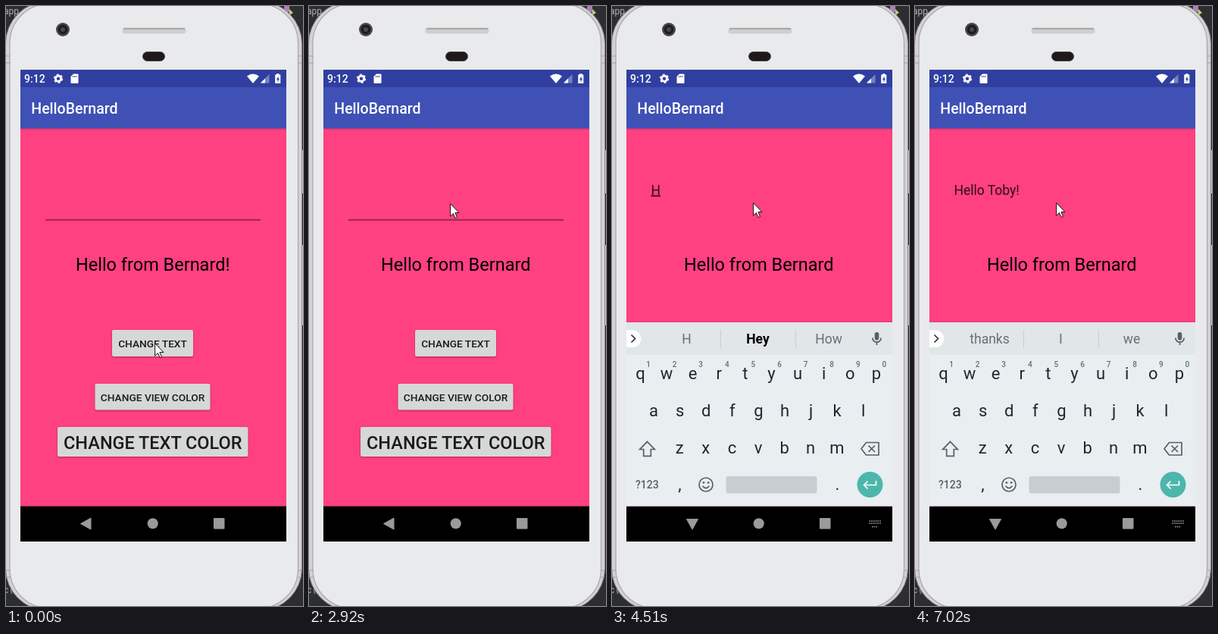
An HTML page that plays this animation: 392 px wide and 791 px high, repeating every 8000 ms.

```html
<!DOCTYPE html>
<html lang="en">
<head>
<meta charset="utf-8">
<title>Phone text demo</title>
<style>
html, body { margin: 0; width: 100%; height: 100%; overflow: hidden; background: #2d2e30; }
svg { display: block; width: 100vw; height: 100vh; font-family: Roboto, sans-serif; }
text { white-space: pre; }
.mid text, text.mid { text-anchor: middle; }
.medium { font-weight: 500; }
.button rect { fill: #d6d7d7; filter: drop-shadow(0 1px 1px #0005); }
.button text { text-anchor: middle; font-weight: 500; fill: #1b1b1b; }
.line { fill: none; stroke: #566167; stroke-width: 1.7; }
#typing { text-decoration: underline 1px; text-underline-offset: 1px; text-decoration-skip-ink: none; }
#suggestions text { font-size: 17.5px; fill: #667075; }
#suggestions text.best { font-weight: 700; fill: #000; }
</style>
</head>
<body>
<svg viewBox="0 0 392 791">
  <defs>
    <clipPath id="screenClip"><rect x="19" y="84" width="351" height="622"/></clipPath>
    <clipPath id="buttonClip"><rect x="140" y="427" width="107" height="35" rx="2"/></clipPath>
    <linearGradient id="shade" x2="0" y2="1">
      <stop stop-color="#000" stop-opacity=".16"/><stop offset="1" stop-color="#000" stop-opacity="0"/>
    </linearGradient>
  </defs>

  <!-- Desktop behind the phone -->
  <rect width="392" height="791" fill="#2d2e30"/>
  <text x="-3" y="10.500" font-size="12" fill="#aeb4ba">app</text>
  <text x="-3" y="774" font-size="12" fill="#b0b4b8">c</text>
  <path d="M8 766Q5 770 8 775" fill="none" stroke="#4a88c7" stroke-width="1.500"/>
  <rect x="367" y="0" width="7" height="8" fill="#a982b4"/>
  <path d="M374 4V12L379 9Z" fill="#c8cc78"/>

  <!-- Phone body -->
  <path d="M391 190V247M391 315V421" stroke="#d3cfd1" stroke-width="2"/>
  <rect x="-.5" y="-6" width="391" height="803" rx="56" fill="#d6d1d4" stroke="#8d898b"/>
  <rect x="5" y="-3" width="380.500" height="797" rx="52" fill="#e9eaec" stroke="#aea9ac" stroke-width="1.300"/>
  <path d="M0 66H6M0 75H6M385 66H390M385 75H390M0 744H6M0 753H6M385 744H390M385 753H390" stroke="#a5a1a3"/>
  <circle cx="75" cy="31" r="9" fill="#4b4647"/>
  <circle cx="75" cy="31" r="6.500" fill="#1f1d20"/>
  <circle cx="75" cy="31" r="3" fill="#494850"/>
  <rect x="153.500" y="28.500" width="84" height="8" rx="3.500" fill="#d0cfd0"/>
  <path d="M155 30H236" stroke="#aaa7a8" stroke-width="2"/>
  <rect x="180.500" y="60.500" width="29" height="12" rx="6" fill="#1e1a1b" stroke="#4a4647"/>

  <g clip-path="url(#screenClip)">
    <rect x="19" y="659" width="351" height="47"/>
    <rect x="19" y="161" width="351" height="498.500" fill="#ff4081"/>
    <rect x="19" y="84" width="351" height="23.500" fill="#303f9f"/>
    <rect x="19" y="107" width="351" height="54.500" fill="#3f51b5"/>
    <rect x="19" y="161.500" width="351" height="2.500" fill="url(#shade)"/>

    <!-- Status bar -->
    <g fill="#fff">
      <text class="medium" x="24" y="100.500" font-size="14">9:12</text>
      <circle cx="69" cy="95.700" r="3.600" fill="none" stroke="#fff" stroke-width="2.800"/>
      <circle cx="69" cy="95.700" r="5.300" fill="none" stroke="#fff" stroke-width="1.800" stroke-dasharray="2.775"/>
      <path d="M89 89.500H94.500Q95.500 89.500 95.500 90.500V101Q95.500 102 94.500 102H86.500Q85.500 102 85.500 101V93Z"/>
      <path d="M88.500 92V94M90.500 92V94M92.500 92V94" stroke="#303f9f"/>
      <path d="M318 92.500Q326 86.500 334 92.500L326 102Z"/>
      <path d="M347.500 90V101.500H336Z" opacity=".35"/>
      <path d="M342 95.500V101.500H336Z"/>
      <path d="M357 89.300H360.500V90.500H362.300V102H355.200V90.500H357Z"/>
      <path d="M359.500 92.500L357 97H358.500V100.500L361 95.800H359.500Z" fill="#303f9f"/>
      <text class="medium" x="33.300" y="141.500" font-size="19.500">HelloBernard</text>
    </g>

    <!-- App content -->
    <rect id="fieldLine" x="52" y="281.500" width="284" height="1" opacity=".75"/>
    <text x="51.500" y="248.500" font-size="17.500" opacity=".82"><tspan id="typed"></tspan><tspan id="typing"></tspan></text>
    <text id="message" class="mid" x="193.700" y="348.700" font-size="23.500"></text>
    <g class="button">
      <rect id="changeText" x="140" y="427" width="107" height="35" rx="2"/>
      <circle id="ripple" cx="184" cy="445" r="40" opacity=".12" clip-path="url(#buttonClip)"/>
      <text x="193.500" y="449.500" font-size="13.700">CHANGE TEXT</text>
      <rect x="117.500" y="498" width="152" height="34.500" rx="2"/>
      <text x="193.500" y="520.500" font-size="13.700">CHANGE VIEW COLOR</text>
      <rect x="68" y="555" width="251.500" height="39" rx="2"/>
      <text x="193.700" y="584" font-size="23.500">CHANGE TEXT COLOR</text>
    </g>

    <!-- Navigation bar -->
    <g fill="#9a9a9a">
      <path id="back" stroke="#9a9a9a" stroke-linejoin="round"/>
      <circle cx="193.700" cy="682.300" r="7"/>
      <rect x="274" y="675" width="14.500" height="14.500" rx="1"/>
      <path id="switcher" d="M339.500 679H355M339.500 682H355M343 686.500H351" stroke="#9a9a9a" stroke-width="1.700" stroke-dasharray="1.700 1"/>
    </g>

    <g id="keyboard">
      <rect x="19" y="415.500" width="351" height="1.500" fill="#000" opacity=".06"/>
      <rect x="19" y="417" width="351" height="242.500" fill="#e9eef1"/>
      <rect x="19" y="417" width="351" height="43" fill="#e1e6e9"/>
      <path d="M143.500 427V451M242.500 427V451" stroke="#c8ced1"/>
      <path d="M19 427.500H27A11 11 0 0 1 27 450H19Z" fill="#fff"/>
      <path class="line" d="M25.500 433.500L30.500 438.500L25.500 443.500" style="stroke:#333"/>
      <rect x="346.700" y="430" width="5.600" height="10.500" rx="2.800" fill="#566167"/>
      <path class="line" d="M343.800 437.500A5.700 5.700 0 0 0 355.200 437.500M349.500 443V447"/>
      <g id="suggestions" class="mid">
        <text x="98.500" y="445.200"></text><text x="192.500" y="445.200"></text><text x="286" y="445.200"></text>
      </g>
      <g id="keys" class="mid" fill="#1c292f"></g>
      <path class="line" d="M46.500 574.300L56.300 584.500H51.300V593.300H41.700V584.500H36.700Z"/>
      <path class="line" stroke-linejoin="round" d="M335.500 575.500H352V592H335.500L329 583.750ZM338.500 579.500L347 588M347 579.500L338.500 588"/>
      <text class="mid medium" x="46.300" y="636.200" font-size="14" fill="#566167">?123</text>
      <circle class="line" cx="124" cy="631" r="9"/>
      <path class="line" d="M119.500 632.800Q124 638.300 128.500 632.800"/>
      <circle cx="120.900" cy="628.300" r="1.400" fill="#566167"/><circle cx="127.100" cy="628.300" r="1.400" fill="#566167"/>
      <rect x="150.500" y="620" width="120" height="22.500" rx="3" fill="#c8cdd1"/>
      <circle cx="340.500" cy="631" r="17" fill="#4db6ac"/>
      <path class="line" d="M348.500 626V631.500H333M337.500 626.500L332.500 631.500L337.500 636.500" style="stroke:#fff"/>
    </g>
    <path id="pointer" d="M0 0V16.500L3.800 12.900L6.500 18.900L8.900 17.900L6.300 11.900H11.400Z" fill="#fff" stroke="#111"/>
  </g>
</svg>
<script>
const LOOP = 8000;
const el = id => document.getElementById(id);
const show = (id, on) => el(id).setAttribute('visibility', on ? 'visible' : 'hidden');

function addKey(x, y, size, label, extra = '') {
  el('keys').insertAdjacentHTML('beforeend', `<text x="${x}" y="${y}" font-size="${size}" ${extra}>${label}</text>`);
}
[['qwertyuiop', 37.5, 491.6], ['asdfghjkl', 55, 540.6], ['zxcvbnm', 89.2, 589.6]].forEach(([row, x, y]) =>
  [...row].forEach((key, i) => addKey(x + i * 34.6, y, 22, key)));
[...'1234567890'].forEach((digit, i) => addKey(48 + i * 34.6, 476.3, 10, digit, 'class="medium" fill="#667075"'));
addKey(89.5, 638, 22, ',');
addKey(297.5, 638, 22, '.');

// Each step: [start time, values...]
const pointerSteps = [
  [0, 196.6, 444.7], [1790, 195.6, 443.7], [1940, 194.6, 318.7], [2090, 194.6, 263.7],
  [2240, 186, 400], [2370, 182.6, 444.7], [2920, 186.6, 260.7], [3070, 186.6, 259.7]
];
const idleWords = ['thanks', 'I', 'we'];
// [start, committed text, word being typed, suggestions]
const typingSteps = [
  [0, '', '', idleWords],
  [4510, '', 'H', ['H', 'Hey', 'How']],
  [5040, '', 'He', ['H', 'Hey', 'How']],
  [5190, '', 'Hel', ['Hel', 'Hello', 'Help']],
  [5460, '', 'Hell', ['Hell', 'Hello', 'Help']],
  [5580, '', 'Hello', ['Help', 'Hello', 'Hellos']],
  [5730, 'Hello ', '', ['to', 'and', 'the']],
  [6130, 'Hello ', 'T', ['T', 'The', 'To']],
  [6280, 'Hello ', 'To', ['To', 'Too', 'Took']],
  [6430, 'Hello ', 'Tob', ['Tob', 'Toby', 'Tobias']],
  [6580, 'Hello ', 'Toby', ['Toby', 'Toby', 'Tobias']],
  [7020, 'Hello Toby!', '', idleWords]
];
const stepAt = (steps, t) => steps.findLast(([start]) => start <= t);

function render(t) {
  const [, x, y] = stepAt(pointerSteps, t);
  el('pointer').setAttribute('transform', `translate(${x} ${y})`);

  el('message').textContent = 'Hello from Bernard' + (t < 550 ? '!' : '');
  const pressed = (t >= 400 && t < 550) || (t >= 2790 && t < 2920);
  el('changeText').style.fill = pressed ? '#c4c5c5' : '';
  el('changeText').style.filter = pressed ? 'drop-shadow(0 2px 1.5px #0006)' : '';
  show('ripple', t >= 2640 && t < 2790);
  show('fieldLine', t < 3350);

  const imeOpen = t >= 3620;
  el('back').setAttribute('d', imeOpen ? 'M98.500 676.500H113.500L106 690Z' : 'M98.500 682.500L112 675V690Z');
  show('switcher', imeOpen);

  // The keyboard slides up slightly translucent, overlapping the navigation bar
  const entering = t >= 3770 && t < 3890;
  show('keyboard', t >= 3770);
  el('keyboard').setAttribute('opacity', entering ? 0.9 : 1);
  el('keyboard').setAttribute('transform', `translate(0 ${entering ? 3.4 : 0})`);

  const [, committed, word, words] = stepAt(typingSteps, t);
  el('typed').textContent = committed;
  el('typing').textContent = word;
  [...el('suggestions').children].forEach((node, i) => {
    node.textContent = words[i];
    node.setAttribute('class', i === 1 && word ? 'best' : '');
  });
}

function tick() {
  render(performance.now() % LOOP);
  requestAnimationFrame(tick);
}
tick();
</script>
</body>
</html>
```
